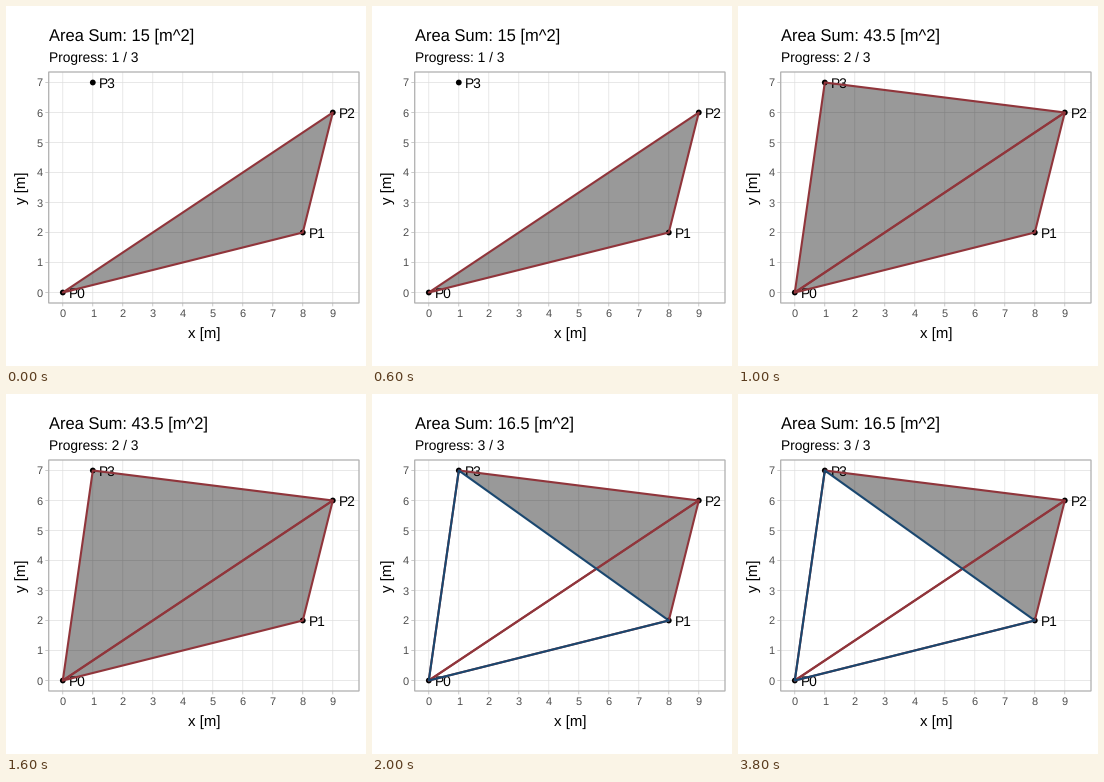
A matplotlib script for the animation above (5 s loop, 360 by 360 pixels).

```python
import matplotlib.pyplot as plt
from matplotlib.animation import FuncAnimation
from matplotlib.patches import Circle, Polygon, Rectangle

SIZE, DPI = 360, 100
PX = 72 / DPI  # points per pixel
UNIT, X0, Y0 = 30, 56.8, 286.5
LEFT, RIGHT, TOP, BOTTOM = 42.7, 353, 66, 297
MAROON, NAVY = "#90353b", "#1a476f"
GRID, BORDER, TICK_TEXT = "#dedede", "#b3b3b3", "#4d4d4d"
POINTS = [(0, 0), (8, 2), (9, 6), (1, 7)]
# Shoelace terms around the triangle P1, P2, P3
EDGES = [(1, 2), (2, 3), (3, 1)]

plt.rcParams["font.family"] = "Liberation Sans"
plt.rcParams["text.hinting"] = "none"
plt.rcParams["path.snap"] = False

fig = plt.figure(figsize=(SIZE / DPI, SIZE / DPI), dpi=DPI, facecolor="white")
ax = fig.add_axes([0, 0, 1, 1])
ax.set_xlim(0, SIZE)
ax.set_ylim(SIZE, 0)
ax.axis("off")


def to_px(point):
    return X0 + UNIT * point[0], Y0 - UNIT * point[1]


def line(xs, ys, color, width, z):
    ax.plot(xs, ys, color=color, lw=width * PX, zorder=z,
            solid_capstyle="butt")


def text(x, y, label, size, color="black", ha="center", z=5, **kw):
    return ax.text(x, y, label, fontsize=size * PX, color=color, ha=ha,
                   va="baseline", zorder=z, **kw)


def triangle(ids, fill, edge, z):
    corners = [to_px(POINTS[i]) for i in ids]
    return ax.add_patch(Polygon(corners, closed=True, facecolor=fill,
                                edgecolor=edge, lw=2.1 * PX,
                                joinstyle="round", zorder=z))


def signed_area(i, j):
    (xi, yi), (xj, yj) = POINTS[i], POINTS[j]
    return (xi * yj - xj * yi) / 2


def draw_axes():
    for v in range(10):
        x = X0 + UNIT * v
        line([x, x], [TOP, BOTTOM], GRID, 0.67, 1)
        line([x, x], [BOTTOM, BOTTOM + 3.4], BORDER, 0.67, 1)
        text(x, 311, str(v), 11, TICK_TEXT)
    for v in range(8):
        y = Y0 - UNIT * v
        line([LEFT, RIGHT], [y, y], GRID, 0.67, 1)
        line([LEFT - 3.4, LEFT], [y, y], BORDER, 0.67, 1)
        text(36.6, y + 4, str(v), 11, TICK_TEXT, ha="right")
    ax.add_patch(Rectangle((LEFT, TOP), RIGHT - LEFT, BOTTOM - TOP,
                           fill=False, ec=BORDER, lw=1.33 * PX, zorder=6))
    text(197.8, 332, "x [m]", 15)
    text(20, 181.5, "y [m]", 15, rotation=90, rotation_mode="anchor")


def draw_points():
    for i, point in enumerate(POINTS):
        x, y = to_px(point)
        ax.add_patch(Circle((x, y), 2.9, fc="black", lw=0, zorder=2))
        text(x + 14.6, y + 5, f"P{i}", 13.8, z=2)


draw_axes()
draw_points()
title = text(LEFT, 34, "", 16.5, ha="left")
subtitle = text(LEFT, 56, "", 13.75, ha="left")

SHADE = (0, 0, 0, 0.4)
fans = [triangle((0, *edge), "none", NAVY if signed_area(*edge) < 0 else MAROON, 4)
        for edge in EDGES]
shades = [triangle(ids, SHADE, "none", 3)
          for ids in [(0, 1, 2), (0, 2, 3), (1, 2, 3)]]


def update(frame):
    step = min(frame, 2)
    for i, fan in enumerate(fans):
        fan.set_visible(i <= step)
    for i, shade in enumerate(shades):
        shade.set_visible(i == 2 if step == 2 else i <= step)
    total = sum(signed_area(*edge) for edge in EDGES[:step + 1])
    title.set_text(f"Area Sum: {total:g} [m^2]")
    subtitle.set_text(f"Progress: {step + 1} / 3")
    return [*fans, *shades, title, subtitle]


anim = FuncAnimation(fig, update, frames=5, interval=1000, repeat=True,
                     repeat_delay=0, blit=False)
plt.show()
```
